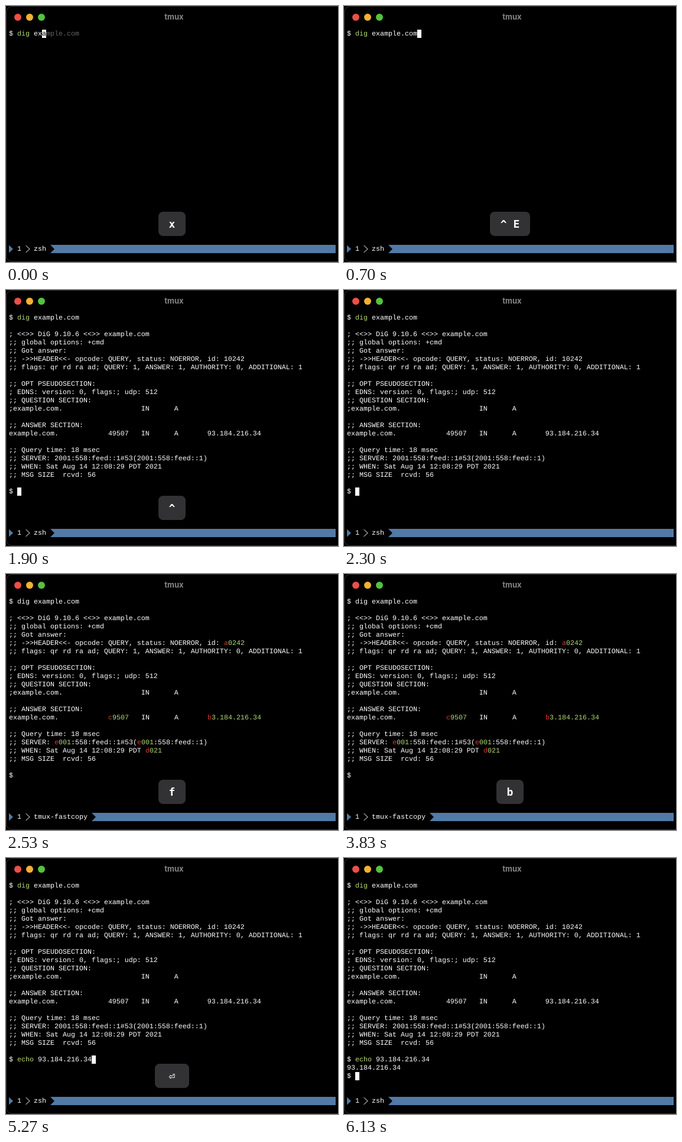
Recreate the animation shown at these times as an HTML page. Size 562 px wide and 433 px high, loop 6710 ms.

```html
<!DOCTYPE html>
<html lang="en">
<head>
<meta charset="utf-8">
<title>tmux</title>
<style>
  html, body { margin: 0; width: 100%; height: 100%; overflow: hidden; background: #000; }
  svg { display: block; width: 562px; height: 433px; }
  text { white-space: pre; }
  .term { font: 11.665px "Liberation Mono", monospace; text-rendering: geometricPrecision; fill: #fff; }
  .title { font: 700 13px Inter, sans-serif; fill: #848484; text-anchor: middle; }
  .key { font: 700 18px "DejaVu Sans Mono", monospace; fill: #fff; text-anchor: middle; }
  .good { fill: #b2d977; }
  .bad { fill: #d8352f; }
  .dim { fill: #626262; }
  .dark { fill: #000; }
</style>
</head>
<body>
<svg viewBox="0 0 562 433">
  <rect width="562" height="433"/>
  <rect x=".5" y=".5" width="590" height="432" rx="10" stroke="#343434"/>
  <circle cx="20" cy="19" r="6" fill="#ed4f4a"/>
  <circle cx="40" cy="19" r="6" fill="#f2b134"/>
  <circle cx="60" cy="19" r="6" fill="#55c23f"/>
  <text class="title" x="284.5" y="23">tmux</text>
  <rect id="cursor" width="7" height="14" fill="#fff"/>
  <g id="rows" class="term"></g>
  <g class="term">
    <path d="M5 404.5l7 6.5l-7 6.5z" fill="#527aa6"/>
    <text x="19" y="414">1</text>
    <path d="M33.5 405l6.5 6l-6.5 6" fill="none" stroke="#fff"/>
    <text id="tab" x="47" y="414"></text>
    <path id="bar" fill="#527aa6"/>
  </g>
  <g id="keycap">
    <rect id="keybox" y="348" height="41" rx="8" fill="#323134"/>
    <text id="keytext" class="key" x="281" y="375"></text>
  </g>
</svg>
<script>
const LOOP = 6710;
const ROW_COUNT = 24;
const IP = '93.184.216.34';

const OUTPUT = `
; <<>> DiG 9.10.6 <<>> example.com
;; global options: +cmd
;; Got answer:
;; ->>HEADER<<- opcode: QUERY, status: NOERROR, id: 10242
;; flags: qr rd ra ad; QUERY: 1, ANSWER: 1, AUTHORITY: 0, ADDITIONAL: 1

;; OPT PSEUDOSECTION:
; EDNS: version: 0, flags:; udp: 512
;; QUESTION SECTION:
${';example.com.'.padEnd(32)}IN      A

;; ANSWER SECTION:
${'example.com.'.padEnd(24)}49507   IN      A       ${IP}

;; Query time: 18 msec
;; SERVER: 2001:558:feed::1#53(2001:558:feed::1)
;; WHEN: Sat Aug 14 12:08:29 PDT 2021
;; MSG SIZE  rcvd: 56
`.split('\n');

const HINTS = { '10242': 'a', [IP]: 'b', '49507': 'c', '2021': 'd', '2001': 'e' };
const HINT_PATTERN = /(10242|93\.184\.216\.34|49507|2021|2001)/;

// [start time, value]; each value holds until the next entry
const KEYS = [
  [0, 'x'], [430, ''], [570, '^'], [670, '^ E'], [970, '⏎'], [1430, ''],
  [1900, '^'], [2000, '^ B'], [2300, ''], [2500, 'f'], [3000, ''], [3830, 'b'],
  [4270, 'e'], [4370, 'c'], [4500, 'h'], [4600, 'o'], [4770, '␣'],
  [4900, '^'], [4970, '^ B'], [5200, ']'], [5270, '⏎'], [5700, '']
];
const DIG = [[0, 'dig ex'], [700, 'dig example.com']];
const ECHO = [
  [0, ''], [4300, 'e'], [4400, 'ec'], [4530, 'ech'], [4630, 'echo'],
  [4800, 'echo '], [5230, 'echo ' + IP]
];
const HISTORY = ['dig example.com', 'echo  ./.git/refs/heads/readme'];

const $ = id => document.getElementById(id);
const SVG_NS = 'http://www.w3.org/2000/svg';
const at = (track, t) => track.findLast(([start]) => t >= start)[1];
const colX = col => 5 + 7 * col;
const rowY = row => 40 + 14 * row;

const rows = Array.from({ length: ROW_COUNT }, (_, i) => {
  const row = document.createElementNS(SVG_NS, 'text');
  row.setAttribute('y', rowY(i) + 10);
  $('rows').append(row);
  return row;
});

function setRow(row, parts) {
  let col = 0;
  row.replaceChildren(...parts.filter(([text]) => text).map(([text, style]) => {
    const span = document.createElementNS(SVG_NS, 'tspan');
    span.setAttribute('x', colX(col));
    if (style) span.setAttribute('class', style);
    span.textContent = text;
    col += text.length;
    return span;
  }));
}

function promptParts(typed, plain) {
  const [, word, rest] = typed.match(/^(\S*)(.*)$/);
  const style = plain ? '' : ['dig', 'echo'].includes(word) ? 'good' : 'bad';
  const match = typed && HISTORY.find(line => line.startsWith(typed));
  const ghost = match ? match.slice(typed.length) : '';
  return [['$ '], [word, style], [rest], [ghost[0], 'dark'], [ghost.slice(1), 'dim']];
}

const hintParts = line => line.split(HINT_PATTERN).flatMap(part =>
  HINTS[part] ? [[HINTS[part], 'bad'], [part.slice(1), 'good']] : [[part]]);

function screen(t) {
  const picking = t >= 2530 && t < 3930;
  const dig = at(DIG, t);
  const echo = at(ECHO, t);
  const lines = [promptParts(dig, picking)];
  let cursor = [0, 2 + dig.length];
  if (t >= 1000) cursor = [1, 0];
  if (t >= 1170) {
    OUTPUT.forEach((line, i) => lines[i + 1] = picking ? hintParts(line) : [[line]]);
    cursor = [21, 0];
  }
  if (t >= 1270) {
    lines[21] = promptParts(echo, picking);
    cursor = [21, 2 + echo.length];
  }
  if (t >= 5300) cursor = [22, 0];
  if (t >= 5330) {
    lines[22] = [[IP]];
    lines[23] = [['$ ']];
    cursor = [23, 2];
  }
  return { lines, cursor: picking ? null : cursor };
}

function drawKey(label) {
  $('keycap').style.display = label ? '' : 'none';
  const width = label === '⏎' ? 58 : 35 + 11 * label.length;
  $('keybox').setAttribute('x', 281 - width / 2);
  $('keybox').setAttribute('width', width);
  $('keytext').textContent = label;
}

function drawStatus(name) {
  const x = colX(7 + name.length);
  $('tab').textContent = name;
  $('bar').setAttribute('d', `M${x} 404H558V418H${x}L${x + 7} 411z`);
}

function render(t) {
  const { lines, cursor } = screen(t);
  rows.forEach((row, i) => setRow(row, lines[i] || []));
  $('cursor').style.display = cursor ? '' : 'none';
  if (cursor) {
    $('cursor').setAttribute('x', colX(cursor[1]));
    $('cursor').setAttribute('y', rowY(cursor[0]));
  }
  drawKey(at(KEYS, t));
  drawStatus(t >= 2530 && t < 4430 ? 'tmux-fastcopy' : 'zsh');
}

const start = performance.now();
function tick() {
  render((performance.now() - start) % LOOP);
  requestAnimationFrame(tick);
}
tick();
</script>
</body>
</html>
```
